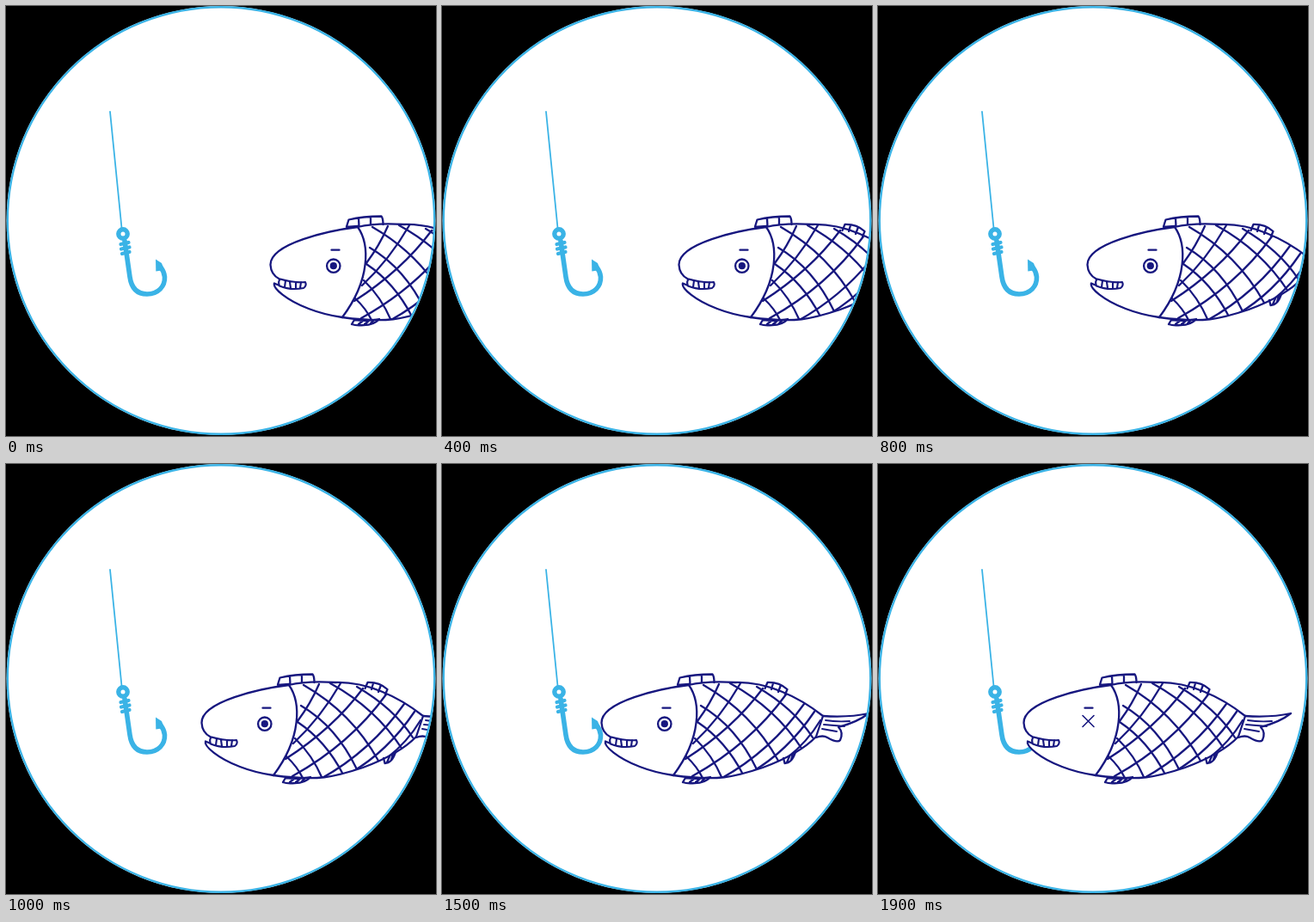
Animation, 500 px wide and 500 px high, one loop 3.4 s. Source, as an HTML page with a canvas:

```html
<!DOCTYPE html>
<html>
<head>
<meta charset="utf-8">
<title>Fish and hook</title>
<style>
html, body { margin: 0; width: 100%; height: 100%; overflow: hidden; background: #000; }
canvas { display: block; width: 500px; height: 500px; }
</style>
</head>
<body>
<canvas id="stage" width="500" height="500"></canvas>
<script>
const ctx = document.getElementById("stage").getContext("2d");
const LOOP = 3400, STEP = 100, BITE = 1900;
const SKY = "#3ab3e6", NAVY = "#17177f";

const flank = `C305 369 324 364 357 353 Q400 337 419 317
  L427 293 C398 270 361 253 325 254 Q291 252 271 257`;
const gillCurve = "M271 257 C285 277 286 318 253 362";
const body = new Path2D(`M271 257 C238 261 169 276 169.5 301
  C170 311 175 315 180 317.5 L180 325 L174 322.5
  C172 328 188 342 214 352 Q232 359 253 362 ${flank}Z`);
const scalesArea = new Path2D(`${gillCurve} ${flank}Z`);
const gill = new Path2D(gillCurve);

const scales = new Path2D(`
  M306 256 Q296 279 281 299 M331 255 Q308 295 276 325
  M357 261 Q322 308 267 343 M384 268 Q342 326 275 363
  M405 279 Q366 334 308 366 M417 288 Q386 334 343 359
  M424 298 Q409 323 385 342
  M285 281 Q326 305 350 355 M281 300 Q314 322 334 361
  M278 319 Q298 338 310 366 M268 340 Q281 352 288 367
  M288 257 Q344 289 375 345 M319 255 Q372 284 403 332
  M350 259 Q393 284 415 318`);

const fins = new Path2D(`
  M258 256.5 L260.5 248.5 Q277 244.5 298.5 244.5 Q300.5 247 300.5 254 M258 257 L271 256
  M272 247 L272.5 256 M286 245 L286 254
  M359.5 261 L362.5 254 Q376 253.5 385.5 262 L383 268
  M369 255 L367 262 M378 257 L375 265
  M264 370 L267 365 Q283 367 296 364 Q290 371 278 371 Q269 372 264 370
  M272 370 L277 366 M279 370 L284 366 M286 369 L290 365
  M381 342 L382.5 348 Q391 348 395 335
  M385 347 L388 340 M390 344 L392 337`);

const tail = new Path2D(`M427 293 Q457 295 480 290
  C470 298 456 303 445 306 Q451 312 447 321 Q444 325 432 318 Q427 315 419 318`);
const tailRays = new Path2D(`M430 298 Q443 300 458 299
  M428 303 L452 305 M426 308 L443 311`);

const teeth = new Path2D(`M181 317.5 Q196 322 210 321 Q212 325 208 328
  Q193 331 180 325.5 Q178 320 181 317.5Z
  M187 319.5 L186 327 M192 321 L193 328 M199 321 L199 329 M205 321 L204 328`);
const brow = new Path2D("M240.5 283.7 H249.5");
const cross = new Path2D("M238 292.5 L251 305.5 M251 292.5 L238 305.5");

const shank = new Path2D(`M138 273 L140 287 L144 315 C146 329 153 335 164 335
  C177 335 185 326 184.5 315 Q184 309 180 304`);
const barb = new Path2D("M174 294.5 L174.3 308.5 L184 307 L181 299Z");
const coils = new Path2D("M133.5 277 L142.5 275 M134 282.5 L143.5 280.5 M135 288 L143.5 286");
const line = new Path2D("M121 123 L134.5 258");

function circle(x, y, r) {
  const path = new Path2D();
  path.arc(x, y, r, 0, Math.PI * 2);
  return path;
}

const bowl = circle(250, 249.5, 249.4);
const rim = circle(250, 249.5, 248.2);
const ring = circle(136, 265, 5.2);
const eye = circle(242.8, 302.2, 7.7);
const pupil = circle(242.8, 302.2, 4.1);

function stroke(path, width, color = NAVY) {
  ctx.strokeStyle = color;
  ctx.lineWidth = width;
  ctx.stroke(path);
}

function fill(path, color) {
  ctx.fillStyle = color;
  ctx.fill(path);
}

function drawHook() {
  stroke(line, 1.8, SKY);
  stroke(ring, 5.4, SKY);
  stroke(coils, 4.2, SKY);
  stroke(shank, 5.6, SKY);
  fill(barb, SKY);
}

function drawFish(offset, caught) {
  ctx.save();
  ctx.translate(offset, 0);
  fill(tail, "#fff");
  fill(body, "#fff");
  ctx.save();
  ctx.clip(scalesArea);
  stroke(scales, 2.3);
  ctx.restore();
  [body, gill, fins, tail].forEach(path => stroke(path, 2.3));
  stroke(tailRays, 1.9);
  fill(teeth, "#fff");
  stroke(teeth, 2.1);
  stroke(brow, 2.3);
  if (caught) {
    stroke(cross, 1.6);
  } else {
    stroke(eye, 2.3);
    fill(pupil, NAVY);
  }
  ctx.restore();
}

// Eight pixels per step, with a slightly longer stride after 1200 ms.
function fishOffset(time) {
  const step = Math.min(17, Math.floor(time / STEP));
  return 138 - 8 * step - (step > 12 ? 2 : 0);
}

function frame() {
  const time = performance.now() % LOOP;
  ctx.fillStyle = "#000";
  ctx.fillRect(0, 0, 500, 500);
  ctx.lineCap = ctx.lineJoin = "round";
  fill(bowl, "#fff");
  ctx.save();
  ctx.clip(rim);
  drawHook();
  drawFish(fishOffset(time), time >= BITE);
  ctx.restore();
  stroke(rim, 2.4, SKY);
  requestAnimationFrame(frame);
}
frame();
</script>
</body>
</html>
```
